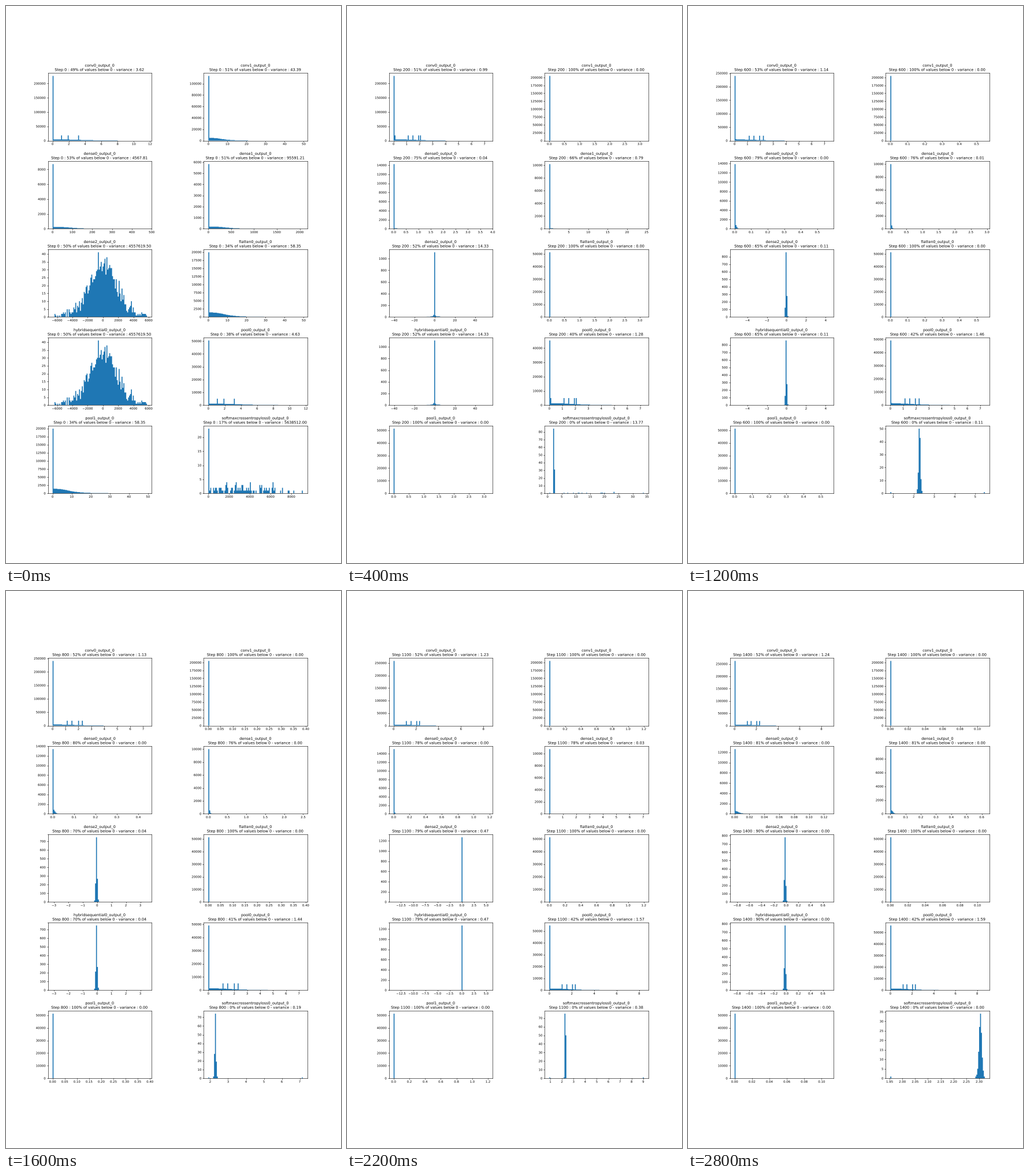
Write a matplotlib script that moves like this. It is 580 px wide and 966 px high and loops after 3000 ms.

```python
import matplotlib.pyplot as plt
import numpy as np
from matplotlib import patheffects
from matplotlib.animation import FuncAnimation

DPI = 32
K = 580 / 15 / DPI  # sizes below are for a figure 15 inches wide
LINE = 0.6 * 72 / DPI
BINS = 100

plt.rcParams.update({
    "font.family": "DejaVu Sans", "text.hinting": "no_hinting",
    "axes.titlesize": 12 * K, "axes.titlepad": 6 * K, "axes.linewidth": LINE,
})
for side in ("xtick", "ytick"):
    plt.rcParams.update({
        f"{side}.labelsize": 10 * K, f"{side}.major.size": 3.5 * K,
        f"{side}.major.pad": 3.5 * K, f"{side}.major.width": LINE,
    })

rng = np.random.default_rng(4)
JITTER = rng.normal(0, 0.8, BINS)
STRAYS = (BINS * rng.beta(1.2, 1.9, 106)).astype(int)

KEYS = [0, 200, 400, 800, 1000, 1200, 1400]
TAIL_KEYS = [0, 200, 400, 1200, 1400]


def at(step, values, keys=KEYS, linear=False):
    """Value at a step; geometric where possible, short lists hold their end."""
    i = max(n for n, key in enumerate(keys) if key <= step)
    a, b = (values[min(n, len(values) - 1)] for n in (i, i + 1))
    if a == b or i + 1 == len(keys):
        return a
    f = (step - keys[i]) / (keys[i + 1] - keys[i])
    if linear or a * b <= 0:
        return a + (b - a) * f
    return a * (b / a) ** f


def share(edges, mean, sd):
    """Part of a logistic distribution that falls in each bin."""
    return np.diff(np.tanh((edges - mean) * np.pi / (2 * np.sqrt(3) * sd))) / 2


def relu(p, step, edges):
    """A falling tail with optional spikes; the rest of the values are zero."""
    hi = edges[-1]
    amp = at(step, p["amp"], TAIL_KEYS)
    width = at(step, p["width"], TAIL_KEYS)
    counts = amp / (1 + (edges[:-1] / width) ** 3)
    if "spike" in p:
        start, soon, late = (1.1, 1.9, 1.9, 3.15), (1.14, 1.5, 1.9, 2.1), (1.14, 1.52, 2.02, 2.32)
        for places in zip(start, soon, late):
            x = np.interp(step, [0, 200, 800], places)
            counts[int(x / hi * BINS)] = p["spike"]
        fade = np.interp(step, [0, 200, 800], [0, 1, 0])
        counts[1] = max(counts[1], p["spike"] * fade)
    counts[0] = p["size"] - counts[1:].sum()
    return counts


def bell(p, step, edges):
    """A narrow peak near zero on top of a wide, noisy bell."""
    sd = at(step, p["sd"])
    mean = -sd * (at(step, p["pct"], linear=True) - 50) / 22
    wide = at(step, [1, 0.12, 0.01])
    base = 1280 * wide * share(edges, 0, np.sqrt(at(step, p["var"])))
    base = np.maximum(base + np.sqrt(base) * JITTER, 0)
    return np.round(base + 1280 * (1 - wide) * share(edges, mean, sd))


def loss(p, step, edges):
    """Most values near log(10), the others scattered one by one."""
    sd = at(step, p["sd"])
    loose = int(at(step, [106, 14, 2]))
    counts = np.round((128 - loose) * share(edges, 2.308 - sd / 2, sd))
    if loose > 2:
        np.add.at(counts, STRAYS[:loose], 1)
    counts[[0, -1]] = np.maximum(counts[[0, -1]], 1)
    return counts


CONV0 = dict(draw=relu, size=442368, amp=[4200], width=[4.2, 2.1], spike=18500,
             pct=[49, 51, 54, 52, 51, 53, 52],
             var=[3.62, 0.99, 1.15, 1.13, 1.18, 1.28, 1.24],
             hi=[11.62, 7.27, 7.415, 7.297, 8.586, 8.234, 8.70])
POOL0 = dict(CONV0, size=110592, amp=[1200, 1350], width=[4.1, 2.1], spike=5100,
             pct=[38, 40, 44, 41, 41, 43, 42],
             var=[4.63, 1.28, 1.49, 1.44, 1.51, 1.63, 1.59])
CONV1 = dict(draw=relu, size=204800, amp=[4800, 0], width=[8.1, 0.05],
             pct=[51, 100], var=[43.39, 0],
             hi=[49.5, 3.13, 0.773, 0.388, 1.434, 1.005, 0.1085])
FLAT = dict(CONV1, size=51200, amp=[1400, 0], width=[9.5, 0.05],
            pct=[34, 100], var=[58.35, 0])
DENSE0 = dict(draw=relu, size=15360, amp=[260, 110, 950, 950, 530],
              width=[105, 0.347, 0.0105, 0.0085, 0.006],
              pct=[53, 75, 78, 80, 79, 78, 81], var=[4567.81, 0.04, 0],
              hi=[476.4, 3.812, 0.739, 0.4408, 1.401, 0.992, 0.1267])
DENSE1 = dict(draw=relu, size=10752, amp=[205, 100, 900, 900, 530],
              width=[428, 1.3, 0.04, 0.02, 0.0155],
              pct=[51, 66, 76, 76, 78, 78, 81],
              var=[95591.21, 0.79, 0.02, 0, 0.04, 0.02, 0],
              hi=[2067, 24.3, 3.454, 2.49, 8.625, 5.765, 0.62])
DENSE2 = dict(draw=bell, sd=[2, 0.2, 0.059, 0.044, 0.003, 0.01, 0.0097],
              pct=[50, 52, 60, 70, 89, 69, 90],
              var=[4557619.50, 14.33, 0.30, 0.04, 0.63, 0.35, 0.001],
              lo=[-6593, -40.6, -9.096, -3.094, -20.38, -9.64, -0.841],
              hi=[5781, 52.8, 5.434, 3.466, 6.41, 4.53, 0.7])
LOSS = dict(draw=loss, sd=[0.06, 0.06, 0.056, 0.035, 0.018, 0.042, 0.006],
            pct=[17, 0], var=[5638512.00, 13.77, 0.06, 0.19, 0.36, 0.40, 0.001],
            lo=[0, 0.65, 0.393, 1.9, 1.367, 0.617, 1.953],
            hi=[9105, 33.9, 4.169, 7.17, 8.99, 9.108, 2.322])

PANELS = {
    "conv0": CONV0, "conv1": CONV1, "dense0": DENSE0, "dense1": DENSE1,
    "dense2": DENSE2, "flatten0": FLAT, "hybridsequential0": DENSE2,
    "pool0": POOL0, "pool1": FLAT, "softmaxcrossentropyloss0": LOSS,
}

fig, axes = plt.subplots(5, 2, figsize=(580 / DPI, 966 / DPI), dpi=DPI)
fig.subplots_adjust(left=0.125, right=0.9, bottom=0.125, top=0.88,
                    wspace=0.5, hspace=0.3)
axes = axes.ravel()
fills = [ax.stairs(np.zeros(BINS), np.arange(BINS + 1), fill=True,
                   color="#1f77b4", snap=False) for ax in axes]
outline = [patheffects.Normal()]  # draws glyphs as smooth paths


def draw(frame):
    step = 100 * frame
    for ax, fill, (name, p) in zip(axes, fills, PANELS.items()):
        lo, hi = at(step, p.get("lo", [0])), at(step, p["hi"])
        edges = np.linspace(lo, hi, BINS + 1)
        counts = p["draw"](p, step, edges)
        top = 1.05 * counts.max()
        unit = top / 219  # bars grow in whole dots of the large figure
        fill.set_data(np.round(counts / unit) * unit, edges)
        pad = 0.05 * (hi - lo)
        ax.set_xlim(lo - pad, hi + pad)
        ax.set_ylim(0, top)
        pct, var = at(step, p["pct"], linear=True), at(step, p["var"])
        title = ax.set_title(f"{name}_output_0\nStep {step} : {pct:.0f}% of values "
                             f"below 0 - variance : {var:.2f}", linespacing=1.33)
        for text in [title, *ax.get_xticklabels(), *ax.get_yticklabels()]:
            text.set_path_effects(outline)
    return fills


anim = FuncAnimation(fig, draw, frames=15, interval=200, repeat=True,
                     repeat_delay=0, blit=False)
plt.show()
```
